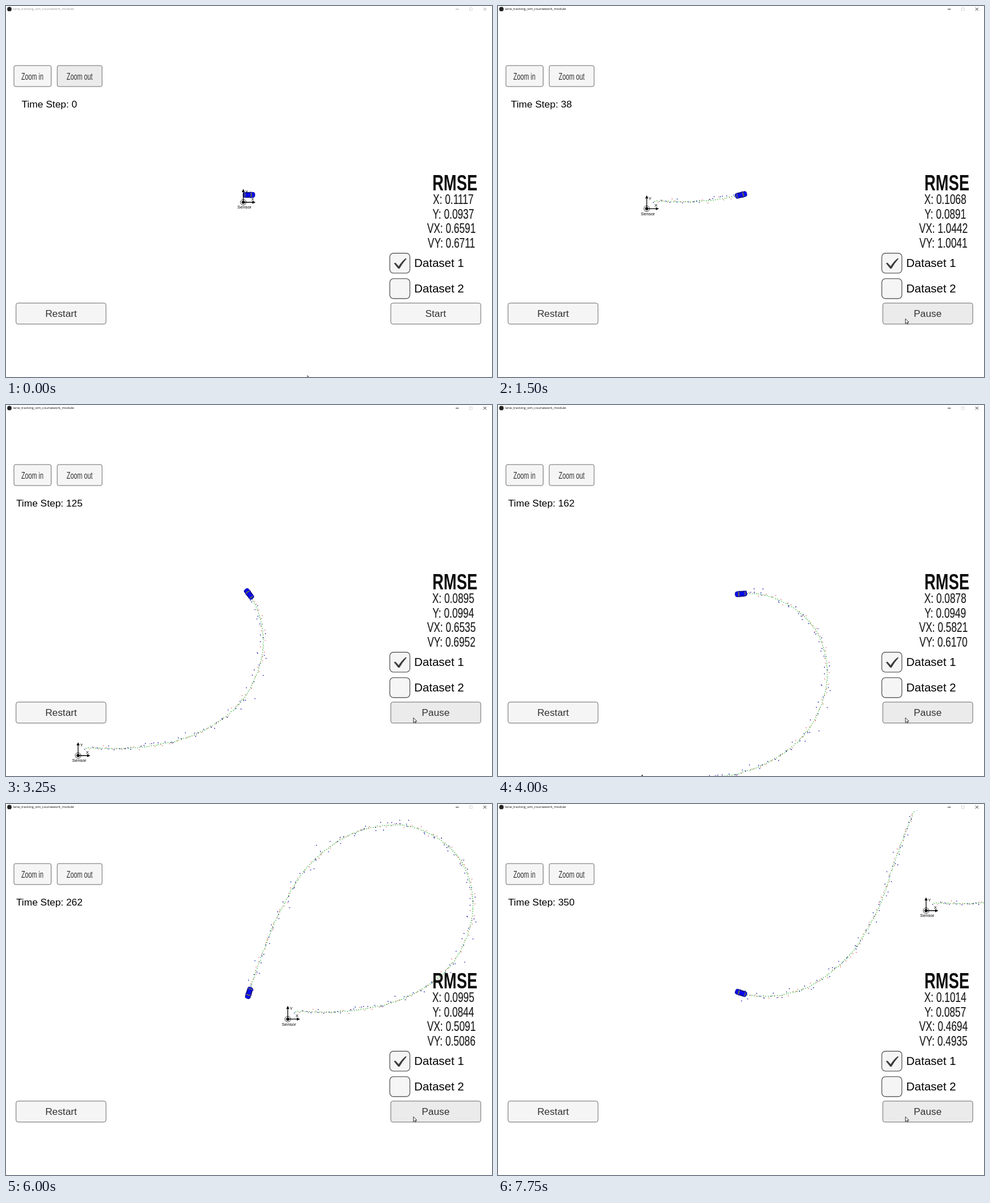
Recreate the animation shown at these times as an HTML page. Size 856 by 654 pixels, loop 8000 ms.

```html
<!DOCTYPE html>
<html lang="en">
<head>
<meta charset="utf-8">
<title>Tracking simulator</title>
<style>
  html, body { margin: 0; width: 100%; height: 100%; overflow: hidden; background: #fff; }
  svg { display: block; width: 856px; height: 654px; font-family: Arial, "Liberation Sans", sans-serif; }
  .btn rect { fill: #f5f5f5; stroke: #6a6a6a; stroke-width: 1; }
  .btn text { fill: #323232; text-anchor: middle; }
  .box rect { fill: #f5f5f5; stroke: #626262; stroke-width: 1.4; }
  .dots path { fill: none; stroke-linecap: round; }
  .mid { text-anchor: middle; }
</style>
</head>
<body>
<svg viewBox="0 0 856 654">
  <rect width="856" height="654" fill="#fff"/>
  <g id="world" class="dots">
    <path id="lidar" stroke="#e27474" stroke-width="1.7"/>
    <path id="radar" stroke="#3030b4" stroke-width="1.8"/>
    <path id="guess" stroke="#22ac22" stroke-width="1.6"/>
  </g>
  <g id="car">
    <path d="M2.6-5.6v11.2" stroke="#111160" stroke-width="1.4"/>
    <rect x="-10.3" y="-4.6" width="20.6" height="9.2" rx="3.4" fill="#0a0aee" stroke="#04047c" stroke-width=".8"/>
    <path d="M2.2-3.6q2 3.6 0 7.2l2.2.3q2-3.9 0-7.8zM-6-3.4q-1.6 3.4 0 6.8l-1.6.2q-1.6-3.6 0-7.2z" fill="#66664a"/>
    <path d="M-4.4-3.9h5.4M-4.4 3.9h5.4" stroke="#11113c" stroke-width=".9"/>
  </g>
  <g id="sensor">
    <circle r="5" fill="none" stroke="#222" stroke-width=".9"/>
    <circle r="2.8"/>
    <path d="M0 0V-19M0 0H17" stroke="#000" stroke-width="1.3"/>
    <path d="M-2.7-18L0-23.5 2.7-18zM16-2.7L21.5 0 16 2.7z"/>
    <text x="3.4" y="-15.8" font-size="7.6">Y</text>
    <text x="13.7" y="-3" font-size="7.8">X</text>
    <text class="mid" x="2" y="11.4" font-size="7.9">Sensor</text>
  </g>

  <rect width="856" height="11.5" fill="#fff"/>
  <circle cx="6" cy="5.4" r="3.9" fill="#222"/>
  <g id="bar">
    <text x="12.6" y="7.4" font-size="5.9" style="font-family:'Open Sans','Noto Sans',sans-serif">lane_tracking_sim_coursework_module</text>
    <path d="M792 5.6h5.6M841 3l5 5M846 3l-5 5" stroke="currentColor" stroke-width=".9"/>
  </g>
  <rect x="816.5" y="3.3" width="4.6" height="4.6" fill="none" stroke="#ccc" stroke-width=".8"/>

  <g class="btn">
    <rect x="14" y="105" width="65.5" height="37" rx="3"/>
    <text transform="translate(46.5 129.6) scale(.68 1)" font-size="15.9">Zoom in</text>
    <rect id="zoomOut" x="90.2" y="105" width="79" height="37" rx="3"/>
    <text transform="translate(129.6 129.6) scale(.68 1)" font-size="15.9">Zoom out</text>
    <rect x="17.7" y="523.7" width="158.4" height="37" rx="3.5"/>
    <text x="97" y="548.2" font-size="17.3">Restart</text>
    <rect id="runBox" x="677.8" y="523.7" width="158.4" height="37" rx="3.5"/>
    <text id="run" x="756.8" y="548.2" font-size="17.3"></text>
  </g>
  <text id="count" class="mid" x="76.4" y="178.5" font-size="17.35"></text>

  <text class="mid" transform="translate(790.6 325.2) scale(.72 1)" font-size="38" font-weight="bold" fill="#0c0c0c">RMSE</text>
  <g id="errors" class="mid" font-size="24" fill="#1c1c1c" stroke="#1c1c1c" stroke-width=".2"></g>

  <g class="box">
    <rect x="676" y="435.7" width="35.4" height="35.2" rx="6.5"/>
    <rect x="676" y="480.6" width="35.4" height="35.2" rx="6.5"/>
    <path d="M683.2 453.6l2.8-1.2 5.6 6.4q5.4-8.6 12.6-14.3l1.2 1.2q-7 7.6-12.3 17.4h-2.2z" fill="#3c3c3c"/>
    <text x="719" y="460" font-size="20.5">Dataset 1</text>
    <text x="719" y="504.8" font-size="20.5">Dataset 2</text>
  </g>
  <path id="cursor" d="M0 0v8.6l2-1.8 1.4 3 1.4-.6-1.4-2.9h2.6z" fill="#fff" stroke="#222" stroke-width=".9"/>
</svg>
<script>
const LOOP = 8000, TICK = 250, LAST = 350, GAP = 25;
const CAR = { x: 428, y: 333 };
const $ = id => document.getElementById(id);
const set = (id, name, value) => $(id).setAttribute(name, value);
const lerp = (a, b, u) => a + (b - a) * u;

// Route relative to the sensor, one point per GAP steps; the two ends only steer.
const route = [
  [-90, -13], [10, -13], [113, -15], [212, -40], [291, -100], [326, -193],
  [301, -285], [220, -338.5], [124, -331], [41, -275], [-14, -189],
  [-53, -93], [-87, 3], [-143, 87], [-227, 142], [-326, 145], [-418, 82]
];

function spline(a, b, c, d, u) {
  return b + u * ((c - a) + u * ((2 * a - 5 * b + 4 * c - d) + u * (3 * b - a - 3 * c + d))) / 2;
}

function place(step) {
  const i = Math.min(Math.floor(step / GAP), route.length - 4);
  const [a, b, c, d] = route.slice(i, i + 4), u = step / GAP - i;
  const [x, y] = [0, 1].map(k => spline(a[k], b[k], c[k], d[k], u));
  return { x, y };
}

let seed = 2417;
function rand() {
  seed = (seed * 16807) % 2147483647;
  return seed / 2147483647;
}
const noise = size => (rand() + rand() + rand() + rand() - 2) * 1.7 * size;
const dot = (x, y) => `M${x.toFixed(1)} ${y.toFixed(1)}h.01`;

// Lidar reads x and y on even steps; radar reads range and bearing on odd ones.
const dots = Array.from({ length: LAST + 1 }, (_, step) => {
  const { x, y } = place(step);
  const guess = dot(x + noise(.4), y + noise(.4));
  if (step % 2 === 0) return { guess, lidar: dot(x + noise(2.3), y + noise(2.3)), radar: "" };
  const range = Math.hypot(x, y) + noise(4.5);
  const angle = Math.atan2(y, x) + noise(.022);
  return { guess, lidar: "", radar: dot(range * Math.cos(angle), range * Math.sin(angle)) };
});

// Error readouts glide between their values at these steps.
const keySteps = [0, 38, 100, 162, 212, 262, LAST];
const errors = {
  X: [.1117, .1068, .0906, .0878, .1039, .0995, .1014],
  Y: [.0937, .0891, .1025, .0949, .0901, .0844, .0857],
  VX: [.6591, 1.0442, .7018, .5821, .5541, .5091, .4694],
  VY: [.6711, 1.0041, .7481, .617, .5601, .5086, .4935]
};

const rows = Object.entries(errors).map(([name, values], i) => {
  const el = document.createElementNS("http://www.w3.org/2000/svg", "text");
  const x = i < 2 ? 787.8 : 784.5;
  el.setAttribute("transform", `translate(${x} ${349.4 + 25.5 * i}) scale(.72 1)`);
  $("errors").append(el);
  return { name, values, el };
});

function showErrors(step) {
  const i = Math.max(1, keySteps.findIndex(s => s >= step));
  const u = (step - keySteps[i - 1]) / (keySteps[i] - keySteps[i - 1]);
  for (const { name, values, el } of rows) {
    el.textContent = `${name}: ${lerp(values[i - 1], values[i], u).toFixed(4)}`;
  }
}

function draw(tick) {
  const running = tick >= 3;
  const step = Math.min(LAST, Math.max(0, Math.floor(38 + (tick - 6) * 12.481)));
  const p = place(step), ahead = place(step + .5);
  const turn = Math.atan2(ahead.y - p.y, ahead.x - p.x) * 180 / Math.PI;
  const shift = `translate(${(CAR.x - p.x).toFixed(2)} ${(CAR.y - p.y).toFixed(2)})`;

  set("world", "transform", shift);
  set("sensor", "transform", shift);
  set("car", "transform", `translate(${CAR.x} ${CAR.y}) rotate(${turn.toFixed(2)})`);
  const seen = step ? dots.slice(1, step + 1) : [];
  for (const kind of ["lidar", "radar", "guess"]) set(kind, "d", seen.map(d => d[kind]).join(""));

  $("count").textContent = "Time Step: " + step;
  showErrors(step);

  const ink = running ? "#111" : "#999";
  set("bar", "fill", ink);
  set("bar", "color", ink);
  $("zoomOut").style.fill = running ? "#f5f5f5" : "#ebebeb";
  $("runBox").style.fill = tick >= 2 ? "#ebebeb" : "#f5f5f5";
  $("run").textContent = running ? "Pause" : "Start";
  const reach = Math.min(1, tick / 2);
  set("cursor", "transform", `translate(${lerp(531, 717.6, reach)} ${lerp(651.5, 551.2, reach)})`);
}

const start = performance.now();
let shown = -1;
function loop() {
  const tick = Math.floor((performance.now() - start) % LOOP / TICK);
  if (tick !== shown) draw(tick);
  shown = tick;
  requestAnimationFrame(loop);
}
loop();
</script>
</body>
</html>
```
